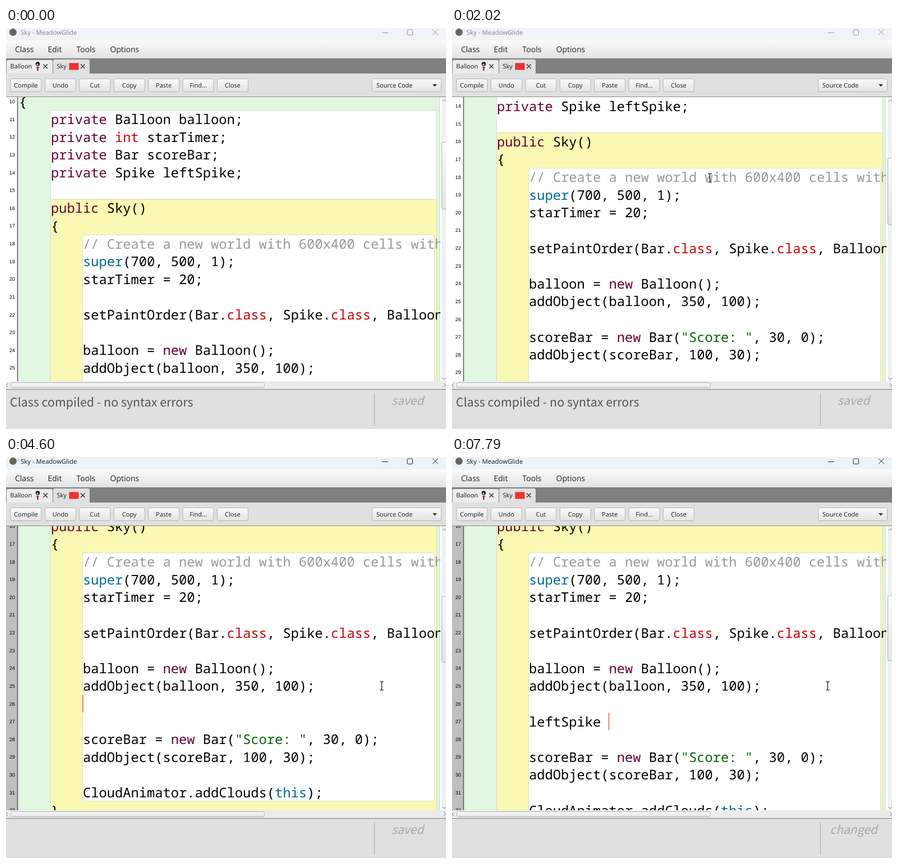
Animation of 784 by 714 pixels, one loop 8000 ms. Source, as an HTML page:

```html
<!DOCTYPE html>
<html lang="en">
<head>
<meta charset="utf-8">
<title>Code editor</title>
<style>
  html, body { margin: 0; width: 100%; height: 100%; overflow: hidden; background: #e0e0e0; }
  svg { display: block; width: 784px; height: 714px; }
  text { font-family: "Open Sans", "Noto Sans", sans-serif; fill: #1c1c1c; white-space: pre; text-rendering: geometricPrecision; }
  .title text { font-size: 11.4px; fill: #858585; }
  .title path, .title rect.box { fill: none; stroke: #929292; }
  .title.active text { fill: #1a1a1a; }
  .title.active path, .title.active rect.box { stroke: #222; }
  .title .bar { fill: #f0f3f8; }
  .title.active .bar { fill: #ecf4fa; }
  .menu text { font-size: 14px; fill: #222; }
  .tabs text, .tools text { font-size: 11px; }
  .tools .label { text-anchor: middle; }
  .btn { fill: url(#btn); stroke: #b4b4b4; }
  .code text { font: 23.75px "Roboto Mono", "Noto Sans Mono", monospace; fill: #000; }
  .code text.num { font: 9px "Liberation Sans", Arial, sans-serif; fill: #000; text-anchor: middle; }
  .code .k { fill: #660033; }
  .code .t { fill: #cc0000; }
  .code .s { fill: #006699; }
  .code .q { fill: #006600; }
  .code .c { fill: #999; }
  .status text { font: 21.4px "Noto Sans CJK JP", "Noto Sans CJK SC", "Noto Sans", sans-serif; fill: #555; }
  .status text.state { font-size: 21px; font-style: italic; fill: #aaa; text-anchor: middle; }
  .x { stroke: #3c3c3c; stroke-width: 1.5; fill: none; }
  .thumb { fill: url(#btn); stroke: #b0b0b0; }
  .arrow { fill: none; stroke: #777; }
</style>
</head>
<body>
<svg viewBox="0 0 784 714" xmlns="http://www.w3.org/2000/svg">
  <defs>
    <linearGradient id="btn" x2="0" y2="1"><stop stop-color="#fafafa"/><stop offset="1" stop-color="#e3e3e3"/></linearGradient>
    <linearGradient id="menu" x2="0" y2="1"><stop stop-color="#fbfbfb"/><stop offset="1" stop-color="#e2e2e2"/></linearGradient>
    <clipPath id="view"><rect y="123" width="774" height="506"/></clipPath>
  </defs>

  <g class="title" id="title">
    <rect class="bar" width="784" height="23"/>
    <circle cx="12.5" cy="7.5" r="6.5" fill="#666558"/>
    <text x="26" y="12">Sky - MeadowGlide</text>
    <path d="M670 8.5h11M760 2.5l10 10M770 2.5l-10 10"/>
    <rect class="box" x="715" y="3" width="9.5" height="9.5" rx="1.5"/>
  </g>

  <g class="menu">
    <rect y="22" width="784" height="32" fill="url(#menu)"/>
    <text x="16" y="43">Class</text><text x="74.5" y="43">Edit</text>
    <text x="125.5" y="43">Tools</text><text x="185.5" y="43">Options</text>
  </g>

  <g class="tabs">
    <rect y="54" width="784" height="27" fill="#808080"/>
    <path d="M1 81V60q0-3 3-3h76q3 0 3 3v21z" fill="#ececec"/>
    <path d="M84 82V59q0-3 3-3h59q3 0 3 3v23z" fill="#e0e0e0"/>
    <text x="7.5" y="72">Balloon</text><text x="90.5" y="72">Sky</text>
    <circle cx="56.5" cy="64" r="3.8" fill="#2b1d1d"/>
    <circle cx="56" cy="65" r="1.6" fill="#e9cdbd"/>
    <path d="M54 69h5l-1 3h-3z" fill="#d42222"/>
    <path d="M56.5 72v4" stroke="#222" stroke-width="2"/>
    <rect x="113" y="63" width="16" height="11" fill="#f03232" stroke="#d62828"/>
    <path class="x" d="M66.5 64.5l7.5 7.5M74 64.5l-7.5 7.5M133 64.5l7.5 7.5M140.5 64.5l-7.5 7.5"/>
  </g>

  <g class="tools" id="tools">
    <rect y="81" width="784" height="42" fill="#e0e0e0"/>
    <rect class="btn" x="652.5" y="90.5" width="123" height="23" rx="3"/>
    <text x="660" y="106">Source Code</text>
    <path d="M760 100h8l-4 4.5z" fill="#333"/>
  </g>

  <g class="code">
    <rect y="122" width="784" height="507" fill="#fff"/>
    <rect id="gutter" y="123" width="20" height="506"/>
    <g clip-path="url(#view)">
      <rect x="22.5" y="100" width="750" height="600" fill="#e1f7e2" stroke="#c6dcc8"/>
      <g id="doc"></g>
    </g>
    <path d="M20.5 122v507" stroke="#444" stroke-width="1.3"/>
    <path d="M0 122.5h784" stroke="#8c8c8c"/>
  </g>

  <g>
    <rect x="776" y="123" width="8" height="506" fill="#f1f1f1"/>
    <path class="arrow" d="M777.5 131l3.5-3.5 3.5 3.5M777.5 622.5l3.5 3.5 3.5-3.5"/>
    <rect id="vthumb" class="thumb" x="776.5" width="14" rx="3"/>
    <rect y="629" width="784" height="14" fill="#ececec"/>
    <path class="arrow" d="M3.5 632.5l-3.5 3.5 3.5 3.5M780 632.5l3.5 3.5-3.5 3.5"/>
    <rect class="thumb" x="8.5" y="631.5" width="452" height="9" rx="3"/>
  </g>

  <g class="status">
    <rect y="643" width="784" height="71" fill="#e0e0e0"/>
    <path d="M0 643.5h784" stroke="#787878"/>
    <path d="M656.5 650v58" stroke="#a8a8a8"/>
    <text id="message" x="7" y="674">Class compiled - no syntax errors</text>
    <text id="state" class="state" x="715.7" y="671.4"></text>
  </g>

  <g id="pointer">
    <path id="beam" d="M-3.5-7.5h2.5l1 1 1-1h2.5M0-6.5V6.5M-3.5 7.5h2.5l1-1 1 1h2.5" fill="none" stroke="#111" stroke-width="1.2"/>
    <path id="arrow" d="M0 0v16l3.7-3.5 2.4 5.6 2.3-1-2.4-5.4h5z" fill="#fff" stroke="#000"/>
  </g>
</svg>

<script>
const LOOP = 8000, ROW = 31.62, COL = 14.25, LEFT = 23, FIRST = 10;
const TOP = 305 - 6 * ROW;            // top of the first listed line, unscrolled
const $ = id => document.getElementById(id);

// Markup: ~k...~ marks a coloured run, k being its class
const head = [
  [0, "{"],
  [4, "~kprivate~ Balloon balloon;"],
  [4, "~kprivate~ ~tint~ starTimer;"],
  [4, "~kprivate~ Bar scoreBar;"],
  [4, "~kprivate~ Spike leftSpike;"],
  [4, ""],
  [4, "~kpublic~ Sky()"],
  [4, "{"],
  [8, "~c// Create a new world with 600x400 cells with~"],
  [8, "~ssuper~(700, 500, 1);"],
  [8, "starTimer = 20;"],
  [8, ""],
  [8, "setPaintOrder(Bar.~tclass~, Spike.~tclass~, Balloon"],
  [8, ""],
  [8, "balloon = ~knew~ Balloon();"],
  [8, "addObject(balloon, 350, 100);"]
];
const tail = [
  [8, ""],
  [8, "scoreBar = ~knew~ Bar(~q\"Score: \"~, 30, 0);"],
  [8, "addObject(scoreBar, 100, 30);"],
  [8, ""],
  [8, "CloudAnimator.addClouds(~sthis~);"],
  [4, "}"],
  [4, ""]
];

const TYPED = "leftSpike ";
const scrolls = [1480, 1760, 2020, 2190, 2360];
const enters = [4540, 5010];
const keys = [5620, 5650, 5800, 6020, 6380, 6760, 7040, 7450, 7600, 7790];
const FOCUS = 3400;
const states = [[0, "saved"], [4540, "changed"], [4600, "saved"], [5010, "changed"], [5190, "saved"], [5620, "changed"]];
// time, x, y
const path = [[290, 661, 700], [480, 540, 420], [680, 459.5, 267], [2950, 459.5, 267],
  [3240, 622, 450], [3440, 664, 410], [3620, 664, 410], [3750, 669.5, 407.5]];

const passed = (list, t) => list.filter(v => v <= t).length;
const rect = (x, y, w, h, fill, line) =>
  `<rect x="${x + .5}" y="${y}" width="${w}" height="${h}" rx="4" fill="${fill}" stroke="${line}"/>`;
const colour = s => s.replace(/~(\w)(.*?)~/g, '<tspan class="$1">$2</tspan>');

["Compile", "Undo", "Cut", "Copy", "Paste", "Find...", "Close"].forEach((name, i) => {
  const x = 8 + i * 61.4;
  $("tools").insertAdjacentHTML("beforeend",
    `<rect class="btn" x="${x}" y="90.5" width="55" height="23" rx="3"/>` +
    `<text class="label" x="${x + 27.5}" y="106">${name}</text>`);
});

function drawDoc(scroll, added, typed, focused) {
  const fresh = [[8, ""], [8, TYPED.slice(0, typed)]].slice(0, added);
  const lines = [...head, ...fresh, ...tail];
  const y = n => TOP - scroll + (n - FIRST) * ROW;
  let out = rect(79, y(11), 688, 900, "#fff", "#cfe0d2")
    + rect(79, y(16), 688, (16 + added) * ROW - 1, "#faf9b4", "#d9d9c0")
    + rect(136, y(18), 627, (13 + added) * ROW - 1, "#fff", "#dcdcd0");
  lines.forEach(([col, code], i) => {
    const top = y(FIRST + i);
    out += `<text class="num" x="11" y="${top + 18.8}">${FIRST + i}</text>`;
    if (code) out += `<text x="${LEFT + col * COL}" y="${top + 24.3}">${colour(code)}</text>`;
  });
  if (focused) {
    const x = LEFT + (added ? 8 + typed : 37) * COL;
    out += `<rect x="${x - .7}" y="${y(25 + added)}" width="1.4" height="31" fill="#f0503c"/>`;
  }
  $("doc").innerHTML = out;
}

function drawPointer(t) {
  $("pointer").style.display = t < path[0][0] ? "none" : "";
  let i = 0;
  while (i < path.length - 2 && path[i + 1][0] <= t) i++;
  const [t0, x0, y0] = path[i], [t1, x1, y1] = path[i + 1];
  const p = Math.min(1, Math.max(0, (t - t0) / (t1 - t0)));
  const x = x0 + (x1 - x0) * p, y = y0 + (y1 - y0) * p;
  $("pointer").setAttribute("transform", `translate(${x} ${y})`);
  $("beam").style.display = y < 629 ? "" : "none";
  $("arrow").style.display = y < 629 ? "none" : "";
}

const start = performance.now();
let last = "";
function frame(now) {
  const t = Math.max(0, now - start) % LOOP;
  const steps = passed(scrolls, t), added = passed(enters, t), typed = passed(keys, t);
  const focused = t >= FOCUS, state = states.filter(s => s[0] <= t).pop()[1];
  const key = [steps, added, typed, focused, state].join();
  if (key !== last) {
    last = key;
    drawDoc(steps * 39.5, added, typed, focused);
    $("title").classList.toggle("active", focused);
    $("gutter").setAttribute("fill", added ? "#bfbfbf" : "#fff");
    $("message").style.display = added ? "none" : "";
    $("state").textContent = state;
    $("vthumb").setAttribute("y", 203.5 + steps * 9.3 - added * 1.5);
    $("vthumb").setAttribute("height", 119 - added * 1.6);
  }
  drawPointer(t);
  requestAnimationFrame(frame);
}
frame(start);
</script>
</body>
</html>
```
